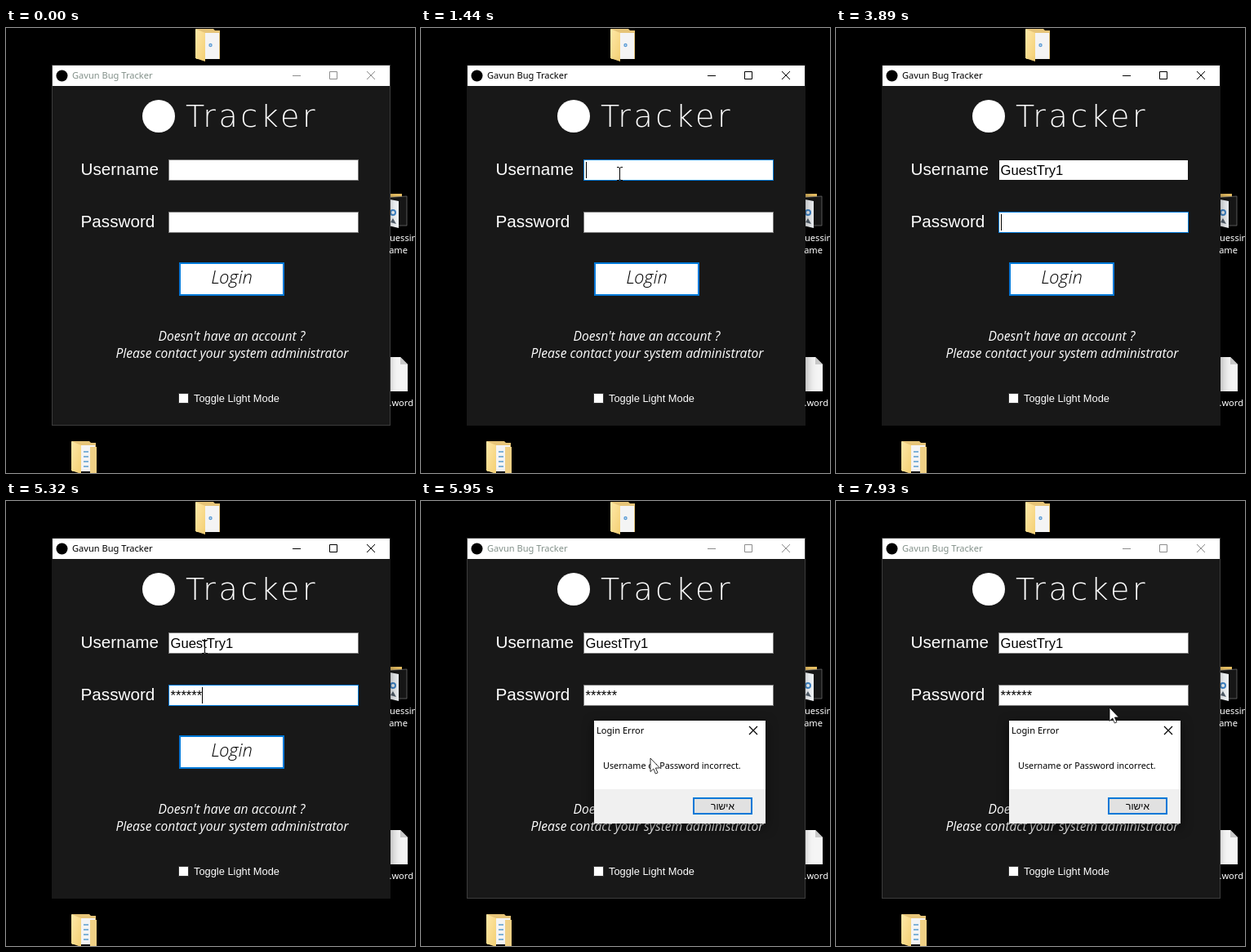
Animation of 501 by 545 pixels, one loop 8 s. Source, as an HTML page:

```html
<!DOCTYPE html>
<html lang="en">
<head>
<meta charset="utf-8">
<title>Login form</title>
<style>
  html, body { margin: 0; width: 100%; height: 100%; overflow: hidden; background: #000; }
  svg { display: block; width: 501px; height: 545px; }
  text { white-space: pre; }
  .ui { font: 11.1px "Noto Sans", "Open Sans", sans-serif; }
  .arial { font-family: "Liberation Sans", Arial, sans-serif; }
  .label { font-size: 20.7px; fill: #fff; }
  .entry { font-size: 16.6px; fill: #000; }
  .slant { font-family: "Open Sans", "Noto Sans", sans-serif; font-style: italic; text-anchor: middle; }
  .line { fill: none; stroke-width: 1; }
  .field { fill: #fff; stroke: #7a7a7a; }
  .field.focus { stroke: #0078d7; }
  .field.bare { stroke: #181818; }
  #frame { fill: #181818; stroke: #3c3c3c; filter: drop-shadow(0 2px 4px rgba(0,0,0,.25)); }
  .active #frame { stroke: #181818; filter: drop-shadow(0 4px 7px rgba(0,0,0,.4)); }
  #title { fill: #83918a; }
  .active #title { fill: #000; }
  #controls { stroke: #8c8c8c; }
  .active #controls { stroke: #000; }
  #dialogFrame { fill: #fff; filter: drop-shadow(0 4px 7px rgba(0,0,0,.6)); }
</style>
</head>
<body>
<svg viewBox="0 0 501 545">
  <defs>
    <linearGradient id="leaf" x2="1" y2="1">
      <stop offset="0" stop-color="#ffe9a9"/><stop offset="1" stop-color="#f3cf73"/>
    </linearGradient>
    <g id="folder">
      <path d="M1 1H22L24 3H30V38H1Z" fill="#e6c478"/>
      <path d="M12 6H29V38H12Z" fill="#f4f4f4"/>
    </g>
    <path id="cover" d="M0 1L12 6V41L0 37Z" fill="url(#leaf)"/>
  </defs>

  <!-- desktop -->
  <g transform="translate(232)">
    <use href="#folder"/>
    <circle cx="18.500" cy="21" r="2.200" fill="#5a9bd5"/><circle cx="18.500" cy="21" r=".8" fill="#fff"/>
    <use href="#cover"/>
  </g>
  <g transform="translate(80 505)">
    <use href="#folder"/>
    <path d="M23 8H31V40H23Z" fill="#f0d085"/>
    <path d="M15 14H21M15 20H21M15 26H21M15 32H21" stroke="#7fb2d8" stroke-width="2"/>
    <use href="#cover"/>
  </g>
  <path d="M460 203H485V210H460Z" fill="#e5bd62"/>
  <path d="M460 208L491 206V242H460Z" fill="#161616" stroke="#777" stroke-width=".7"/>
  <path d="M460 208L481 212V245L460 240Z" fill="#eef1f4"/>
  <circle cx="474" cy="226" r="3" fill="none" stroke="#3f83c4" stroke-width="2"/>
  <path d="M471 238L474 233L478 240Z" fill="#53606d"/>
  <path d="M460 403H483L492 412V445H460Z" fill="#f5f5f5"/>
  <path d="M483 403V412H492Z" fill="#c9c9c9"/>

  <!-- login window -->
  <g id="win">
    <rect id="frame" x="56.5" y="45.5" width="414" height="441"/>
    <rect x="57" y="46" width="413" height="25" fill="#fff"/>
    <circle cx="68.500" cy="58.500" r="7" fill="#000"/>
    <text id="title" class="ui" x="81" y="62">Gavun Bug Tracker</text>
    <path id="controls" class="line" d="M351 58.500H361M396.500 53.500H405.500V62.500H396.500ZM442 53L452 63M452 53L442 63"/>

    <circle cx="187" cy="108" r="20" fill="#fff"/>
    <text x="220" y="121" fill="#fff" style="font:200 38px 'DejaVu Sans',sans-serif;letter-spacing:3.6px">Tracker</text>

    <text class="arial label" x="91.500" y="180">Username</text>
    <text class="arial label" x="91.500" y="244">Password</text>
    <rect id="userBox" class="field" x="199.500" y="161.500" width="232" height="25"/>
    <rect id="passBox" class="field" x="199.500" y="225.500" width="232" height="25"/>
    <text id="user" class="arial entry" x="201.500" y="180"></text>
    <text id="pass" class="arial entry" x="201.500" y="244"></text>
    <rect id="caret" width="1" height="20"/>

    <rect x="212" y="287" width="129" height="41" fill="#0078d7"/>
    <rect id="btnFace" fill="#fff"/>
    <rect id="btnDots" class="line" x="213.500" y="288.500" width="126" height="38" stroke="#000" stroke-dasharray="1" stroke-dashoffset=".5"/>
    <text class="slant" x="276.500" y="313" font-size="22" font-weight="300">Login</text>

    <g class="slant" font-size="15.7" fill="#fff">
      <text x="276.500" y="383">Doesn't have an account ?</text>
      <text x="277" y="404">Please contact your system administrator</text>
    </g>
    <rect x="211.500" y="447.500" width="12" height="12" fill="#fff" stroke="#333"/>
    <text class="arial" x="230" y="458" font-size="12.85" fill="#fff">Toggle Light Mode</text>
  </g>

  <!-- icon captions beside the window -->
  <g class="ui" fill="#fff">
    <text x="470" y="261">uessin</text>
    <text x="492" y="276" text-anchor="end">ame</text>
    <text x="499" y="463" text-anchor="end">.word</text>
  </g>

  <!-- message box -->
  <g id="dialog">
    <rect id="dialogFrame" x="212" y="269" width="210" height="126"/>
    <rect x="212" y="353" width="210" height="42" fill="#f0f0f0"/>
    <text class="ui" x="215" y="285">Login Error</text>
    <path class="line" d="M402 276L412 286M412 276L402 286" stroke="#000" style="stroke-width:1.2"/>
    <text class="ui" x="223" y="328" style="font-size:10.8px">Username or Password incorrect.</text>
    <rect x="334" y="364" width="71" height="19" fill="#e1e1e1" stroke="#0078d7" stroke-width="2"/>
    <text class="arial" x="369.500" y="378" font-size="12" text-anchor="middle">אישור</text>
  </g>

  <!-- pointer -->
  <g id="pointer">
    <circle id="halo" r="12" cx="-.5" cy=".5" fill="#f5e52a" fill-opacity=".62"/>
    <path id="arrow" d="M0 0V16.500L3.800 13L6.300 19L9 17.800L6.400 12H11.500Z" fill="#fff" stroke="#000" stroke-width=".8"/>
    <path id="beam" class="line" d="M-3 -7.500H-1L.5 -6.500L2 -7.500H4M.5 -6.500V7.500M-3 8.500H-1L.5 7.500L2 8.500H4" stroke="#000"/>
  </g>
</svg>

<script>
const LOOP = 8000;
const NAME = "GuestTry1";
const nameKeys = [1860, 2180, 2370, 2560, 2920, 3060, 3250, 3320, 3580];
const passKeys = [4330, 4420, 4510, 4750, 4820, 4890];

// time, x, y
const path = [
  [140, 262, 70], [560, 227, 143], [630, 227, 143], [870, 233, 161], [990, 233, 161],
  [1180, 243, 178], [5320, 243, 178], [5740, 281, 315], [6250, 281, 315], [6690, 329, 252],
  [7490, 329, 252], [7490, 349, 252], [7930, 349, 252], [7930, 335, 253], [LOOP, 335, 253]
];

const $ = id => document.getElementById(id);
const within = (t, a, b) => t >= a && t < b;
const show = (id, on) => { $(id).style.display = on ? "" : "none"; };
const typed = (t, keys) => keys.filter(k => t >= k).length;

function pointAt(t) {
  const i = path.findIndex(p => p[0] > t);
  if (i < 0) return path[path.length - 1].slice(1);
  if (i === 0) return path[0].slice(1);
  const [t0, x0, y0] = path[i - 1], [t1, x1, y1] = path[i];
  const k = (t - t0) / (t1 - t0);
  return [x0 + (x1 - x0) * k, y0 + (y1 - y0) * k];
}

function setFields(t) {
  const onUser = within(t, 1250, 3890), onPass = within(t, 3890, 5810);
  $("user").textContent = NAME.slice(0, typed(t, nameKeys));
  $("pass").textContent = "*".repeat(typed(t, passKeys));
  $("userBox").classList.toggle("focus", onUser);
  $("userBox").classList.toggle("bare", within(t, 3890, 5320));
  $("passBox").classList.toggle("focus", onPass);
  show("caret", onUser || onPass);
  const text = onPass ? $("pass") : $("user");
  const width = text.textContent ? text.getComputedTextLength() : 0;
  $("caret").setAttribute("x", Math.round(201.5 + width));
  $("caret").setAttribute("y", onPass ? 228 : 164);
}

function setButton(pressed) {
  const edge = pressed ? 1 : 2;
  const box = { x: 212 + edge, y: 287 + edge, width: 129 - 2 * edge, height: 41 - 2 * edge };
  for (const key in box) $("btnFace").setAttribute(key, box[key]);
  show("btnDots", pressed);
}

function setPointer(t) {
  const [x, y] = pointAt(t);
  const overField = t < 5950 && x > 199 && x < 432 &&
    (within(y, 162, 187) || within(y, 225, 251));
  show("pointer", within(t, 140, 1860) || t >= 5320);
  show("arrow", !overField);
  show("beam", overField);
  show("halo", within(t, 870, 990) || within(t, 1250, 1440) || within(t, 5810, 5950));
  $("pointer").setAttribute("transform", `translate(${Math.round(x)} ${Math.round(y)})`);
}

function draw(t) {
  $("win").classList.toggle("active", within(t, 870, 5950));
  setFields(t);
  setButton(t >= 5810);
  show("dialog", t >= 5950);
  setPointer(t);
}

const start = performance.now();
function tick() {
  draw((performance.now() - start) % LOOP);
  requestAnimationFrame(tick);
}
tick();
</script>
</body>
</html>
```
